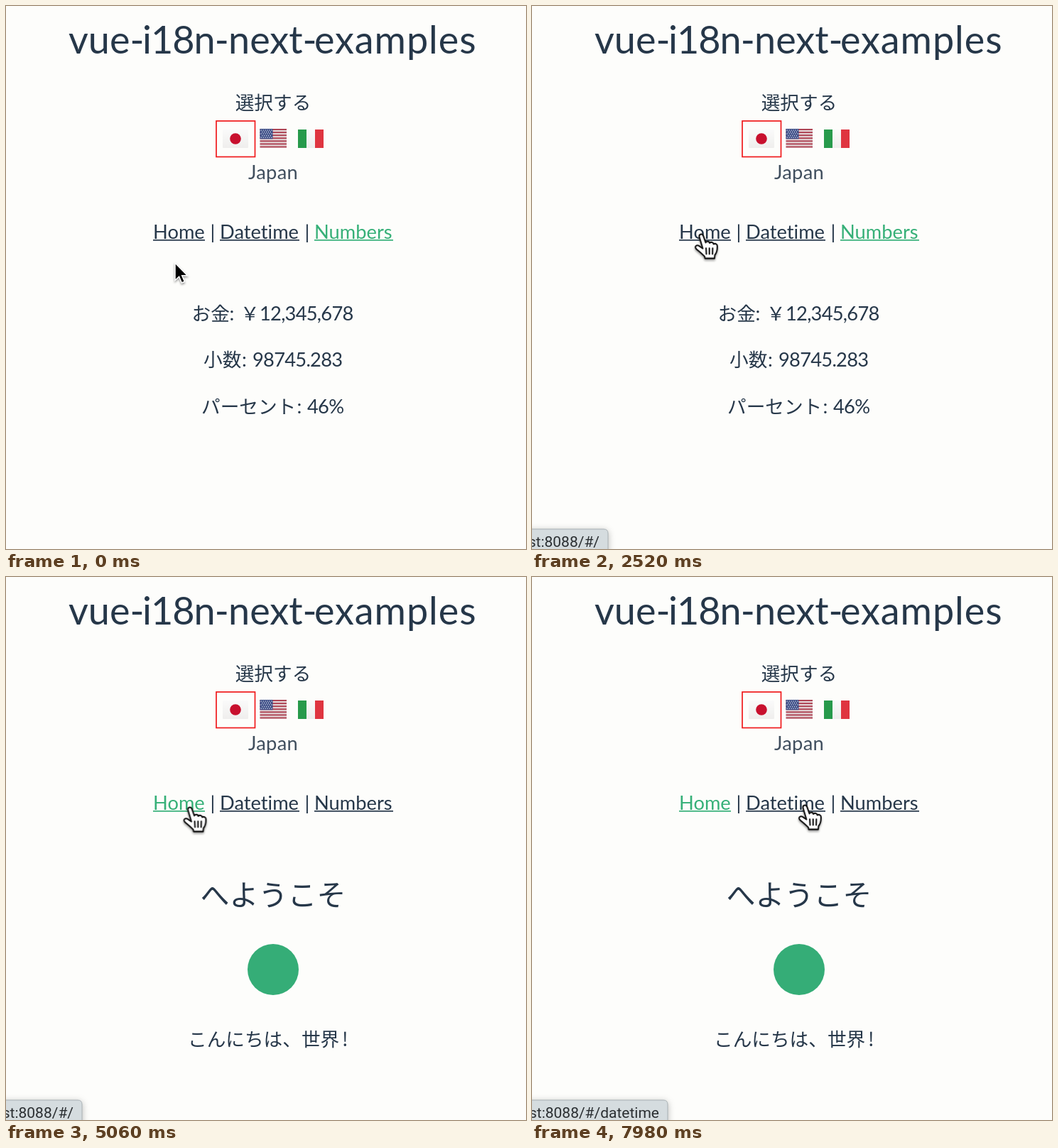
Write an HTML page that moves like this. It is 732 px wide and 765 px high and loops after 8000 ms.

```html
<!DOCTYPE html>
<html lang="ja">
<head>
<meta charset="utf-8">
<title>vue-i18n-next-examples</title>
<style>
  html, body { margin: 0; width: 100%; height: 100%; overflow: hidden; background: #fdfdfb; }
  svg { display: block; }
  text { font: 27.3px Lato, sans-serif; font-variant-ligatures: none; white-space: pre; }
  .ink { fill: #263749; }
  .mid { text-anchor: middle; }
  .title { font-size: 54px; }
  .jp { font: 350 26.67px "Noto Sans CJK JP", "Noto Sans CJK", sans-serif; }
  .big { font-size: 41px; }
  .num { letter-spacing: -.75px; }
  .status text { font: 21px Roboto, sans-serif; fill: #2b2f32; }
  .status path { fill: #d5dcdf; stroke: #a8b0b4; filter: drop-shadow(0 2px 5px #0004); }
  #arrow, #hand { filter: drop-shadow(0 2px 1.5px #0006); }
</style>
</head>
<body>
<svg width="732" height="765" viewBox="0 0 732 765">
  <defs>
    <linearGradient id="cloth" x2="0" y2="1">
      <stop stop-color="#fafafa"/><stop offset="1" stop-color="#efeeed"/>
    </linearGradient>
  </defs>

  <g class="ink">
    <text class="title" y="67"><tspan x="88">vue-</tspan><tspan x="192" letter-spacing="-1">i18n-</tspan><tspan x="313">next-</tspan><tspan x="434" letter-spacing=".9">examples</tspan></text>
    <text class="mid jp" x="376" y="146">選択する</text>
    <text class="mid" x="376" y="244" letter-spacing=".3" opacity=".88">Japan</text>
    <text class="mid" x="291" y="328">|</text>
    <text class="mid" x="424" y="328">|</text>
  </g>

  <rect x="305" y="174" width="36" height="26" rx="1" fill="url(#cloth)"/>
  <circle cx="323" cy="187" r="7.8" fill="#c8102e"/>
  <rect x="296" y="162" width="54.5" height="50.5" fill="none" stroke="#f0191c" stroke-width="1.7"/>
  <g id="us"></g>
  <rect x="411" y="174" width="12" height="26" fill="#279a4b"/>
  <rect x="423" y="174" width="12" height="26" fill="url(#cloth)"/>
  <rect x="435" y="174" width="12" height="26" fill="#df3540"/>

  <g id="home" class="ink"><text x="207" y="328">Home</text><rect x="207" y="329" width="73" height="1.7"/></g>
  <g class="ink"><text x="301" y="328">Datetime</text><rect x="301" y="329" width="112" height="1.7"/></g>
  <g id="numbers" class="ink"><text x="434" y="328">Numbers</text><rect x="434" y="329" width="111" height="1.7"/></g>

  <g id="numbersPage" class="ink">
    <text class="jp" x="261.5" y="443">お金</text><text x="314.5" y="443">:</text>
    <text class="jp" x="330" y="443">￥</text><text class="num" x="357" y="443">12,345,678</text>
    <text class="jp" x="278" y="508">小数</text><text x="332" y="508">:</text>
    <text class="num" x="347" y="508">98745.283</text>
    <text class="jp" x="275" y="574">パーセント</text><text x="409.5" y="574">:</text>
    <text class="num" x="424" y="574">46%</text>
  </g>
  <g id="homePage" class="ink">
    <text class="mid jp big" x="376" y="463">へようこそ</text>
    <circle cx="376" cy="553" r="36" fill="#35ad77"/>
    <text class="jp" x="256" y="661">こんにちは、世界</text><text class="jp" x="473" y="661">!</text>
  </g>

  <g id="status" class="status">
    <g id="homeUrl">
      <path d="M-9 737H101q6 0 6 6V775H-9z"/>
      <text x="95" y="762" text-anchor="end">localhost:8088/#/</text>
    </g>
    <g id="dateUrl">
      <path d="M-9 737H185q6 0 6 6V775H-9z"/>
      <text x="179" y="762" text-anchor="end">localhost:8088/#/datetime</text>
    </g>
  </g>

  <g id="cursor">
    <path id="arrow" d="M0 0V24.5L5.6 19.2 9.4 28 13.4 26.3 9.7 17.7H17.4z" fill="#000" stroke="#fff" stroke-width="1.5"/>
    <g id="hand" transform="translate(-10 -2) scale(1.03)" stroke="#111" stroke-width="2" stroke-linejoin="round" stroke-linecap="round">
      <path fill="#fff" d="M12 21L7.5 6C6 1.5 11-.5 12.8 4L16 13C17 10.5 21 11 21.3 13.5 23 11.5 26.5 12.5 26.7 15 29 13.5 32 15 31.8 18 32 23 31 27 28.5 30L28 34.5H15L14.5 32C11 28 7 25 3 21.5 0 18 4 15.5 7 17.5z"/>
      <path fill="none" d="M16.5 20.5l.4 8M21 20.5v8M25.5 20.5l-.2 8"/>
    </g>
  </g>
</svg>
<script>
const LOOP = 8000, INK = '#263749', GREEN = '#36b078';
const el = id => document.getElementById(id);

function drawUsFlag() {
  const [x, y, w, h] = [357.5, 173, 37.5, 26.5], stripe = h / 13;
  const rect = (dy, rw, rh, fill) => `<rect x="${x}" y="${y + dy}" width="${rw}" height="${rh}" fill="${fill}"/>`;
  let out = rect(0, w, h, '#e6dcdd');
  for (let i = 0; i < 13; i += 2) out += rect(i * stripe, w, stripe, '#ae4656');
  out += rect(0, 18, stripe * 7, '#394b85');
  for (let row = 0; row < 5; row++)
    for (let col = 0; col < 6 - row % 2; col++)
      out += `<circle cx="${x + 1.8 + col * 2.9 + row % 2 * 1.45}" cy="${y + 1.9 + row * 2.6}" r=".75" fill="#e4e6f0"/>`;
  el('us').innerHTML = out;
}

// Each step is [time in ms, value, easing towards the next step].
function animate(id, prop, steps, easing = 'step-end') {
  const frames = steps.map(([t, value, ease]) => ({ offset: t / LOOP, [prop]: value, easing: ease || easing }));
  frames.push({ ...frames.at(-1), offset: 1 });
  const animation = el(id).animate(frames, { duration: LOOP, iterations: Infinity });
  animation.startTime = start;
}

const start = document.timeline.currentTime ?? 0;
const at = (x, y) => `translate(${x}px, ${y}px)`;
const CLICK = 2860, ON_HOME = 960, OFF_HOME = 5130, ON_DATE = 5190;

drawUsFlag();

animate('cursor', 'transform', [
  [0, at(238, 362)],
  [760, at(238, 362), 'ease-in-out'],
  [1040, at(238, 322)],
  [4960, at(238, 322), 'ease-in'],
  [5060, at(258, 325), 'ease-out'],
  [5420, at(387, 325)],
  [7200, at(387, 325), 'ease-in-out'],
  [7500, at(384, 322)],
]);
animate('arrow', 'opacity', [[0, 1], [ON_HOME, 0], [OFF_HOME, 1], [ON_DATE, 0]]);
animate('hand', 'opacity', [[0, 0], [ON_HOME, 1], [OFF_HOME, 0], [ON_DATE, 1]]);

animate('home', 'fill', [[0, INK], [CLICK, GREEN]]);
animate('numbers', 'fill', [[0, GREEN], [CLICK, INK]]);
animate('numbersPage', 'opacity', [[0, 1], [CLICK, 0]]);
animate('homePage', 'opacity', [[0, 0], [CLICK, 1]]);

animate('status', 'opacity', [[0, 0], [1100, 0], [1140, .42], [1240, .42], [1300, 1]], 'linear');
animate('homeUrl', 'opacity', [[0, 1], [ON_DATE, 0]]);
animate('dateUrl', 'opacity', [[0, 0], [ON_DATE, 1]]);
</script>
</body>
</html>
```
